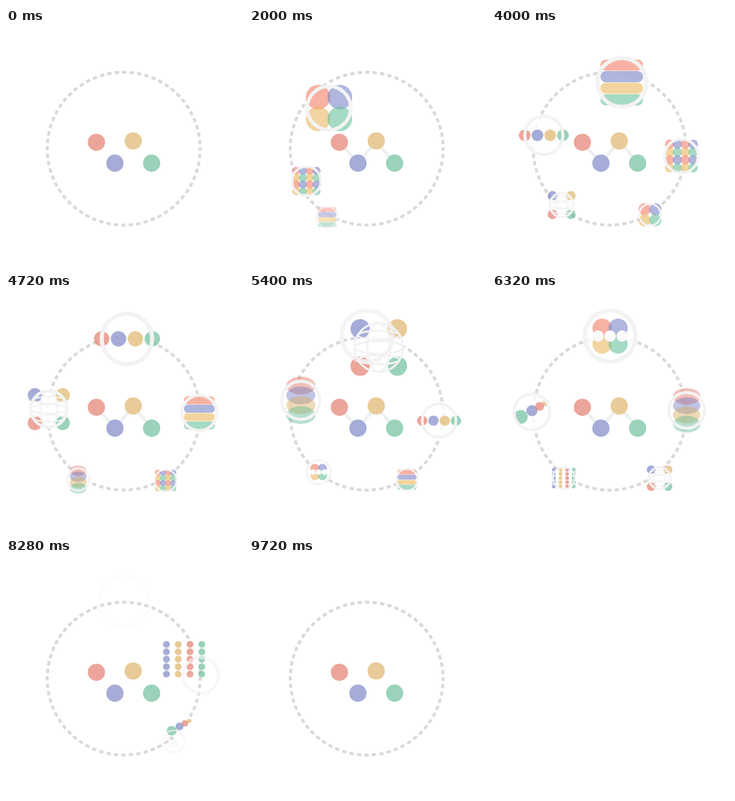
Recreate the animation shown at these times as an HTML page with a canvas. Size 297 px wide and 297 px high, loop 9.9 s.

```html
<!DOCTYPE html>
<html lang="en">
<head>
<meta charset="utf-8">
<title>Dots on a circle</title>
<style>
  html, body { margin: 0; width: 100%; height: 100%; overflow: hidden; background: #fff; }
  canvas { display: block; width: 297px; height: 297px; }
</style>
</head>
<body>
<canvas id="stage"></canvas>
<script>
const SIZE = 297, LOOP = 9900, MOVE = 320, STEPS = 14;
const RED = '#df6957', BLUE = '#6975be', YELLOW = '#d9a853', GREEN = '#57b48c';
const COLORS = [RED, BLUE, YELLOW, GREEN];
const BRIGHT = ['#f37f67', '#7b85c8', '#ebb761', '#69c19d'];
const PALE = '#f3f3f3';

const canvas = document.getElementById('stage');
const ctx = canvas.getContext('2d');
const ratio = window.devicePixelRatio || 1;
canvas.width = canvas.height = Math.round(SIZE * ratio);

const lerp = (a, b, p) => a + (b - a) * p;
const clamp = v => Math.max(0, Math.min(1, v));

function ellipse(x, y, rx, ry = rx) {
  ctx.beginPath();
  ctx.ellipse(x, y, rx, ry, 0, 0, Math.PI * 2);
}
function dot(color, x, y, rx, ry) {
  ctx.fillStyle = color;
  ellipse(x, y, rx, ry);
  ctx.fill();
}
function withAlpha(alpha, draw) {
  ctx.save();
  ctx.globalAlpha *= alpha;
  draw();
  ctx.restore();
}
function corners(colors, offset, r) {
  colors.forEach((c, i) => dot(c, i % 2 ? offset : -offset, i < 2 ? -offset : offset, r));
}

// Each icon is drawn around 0,0 at the size it has on top of the circle.
function quartet() { corners(BRIGHT, 16, 18); }

function mosaic() {
  for (let j = 0; j < 4; j++) {
    for (let i = 0; i < 4; i++) {
      dot(BRIGHT[j % 2 * 2 + i % 2], (i - 1.5) * 15, (j - 1.5) * 15, 8.8);
    }
  }
}
function stripes() {
  BRIGHT.forEach((c, i) => {
    ctx.fillStyle = c;
    ctx.beginPath();
    ctx.roundRect(-28, (i - 2) * 15.2 + 0.3, 56, 14.6, 7);
    ctx.fill();
  });
}
function row() { COLORS.forEach((c, i) => dot(c, (i - 1.5) * 21.4, 0, 9.8)); }

function spread() { corners([BLUE, YELLOW, RED, GREEN], 24.5, 12.7); }

function globe() {
  ctx.strokeStyle = PALE;
  ctx.lineWidth = 2.6;
  for (const [y, rx, ry] of [[0, 32, 32], [0, 15, 32], [0, 32, 8], [-16, 27, 6], [16, 27, 6]]) {
    ellipse(0, y, rx, ry);
    ctx.stroke();
  }
}
function stack() {
  withAlpha(0.7, () => COLORS.forEach((c, i) => dot(c, 0, (i - 1.5) * 16.5, 24.5, 15)));
}
function cluster() { corners(BRIGHT, 10, 12); }

function threeSpots() { [-15, 0, 15].forEach(x => dot('#fafafa', x, 0, 7.2)); }

function comet() {
  dot(GREEN, -20, 9, 12.5);
  dot(BLUE, 0, -2, 10);
  dot(RED, 14, -10, 8);
  dot(YELLOW, 25, -16, 5.5);
}
function columns() {
  [BLUE, YELLOW, RED, GREEN].forEach((c, i) => {
    for (let j = -2; j <= 2; j++) dot(c, (i - 1.5) * 19.3, j * 12.2, 5.6);
  });
}

// On leaving the top, "still" rings fade from place to place instead of travelling.
const icons = [
  { shape: quartet, from: [93, 233], to: [198, 234] },
  { shape: mosaic, from: [95, 237], to: [200, 235] },
  { shape: stripes, from: [98, 237], to: [198, 234] },
  { shape: row, from: [93, 237], to: [206, 232] },
  { shape: spread, from: [94, 235], to: [210, 232], glyph: globe, still: true },
  { shape: stack, from: [92, 237], to: [209, 231] },
  { shape: cluster, from: [94, 238], to: [208, 230], glyph: threeSpots, still: true },
  { shape: comet, from: [91, 233], to: [210, 230], still: true },
  { shape: columns, from: [90, 232], to: [214, 220], still: true }
];

function stations({ from, to }) {
  return [
    [...from, 0.4], [...from, 0.43], [50, 149, 0.7], [148, 54, 1],
    [244, 147, 0.7], [...to, 0.43], [...to, 0.4]
  ];
}

function progress(step, t) {
  const odd = step % 2;
  const start = (odd ? 1087 : 400) + Math.floor(step / 2) * 1400;
  const p = clamp((t - start) / MOVE) ** (odd ? 1 : 1.475);
  return p < 0.5 ? (2 * p) ** 3.5 / 2 : 1 - (2 - 2 * p) ** 3.5 / 2;
}

function at([x, y, scale], draw) {
  ctx.save();
  ctx.translate(x, y);
  ctx.scale(scale, scale);
  draw();
  ctx.restore();
}
function ring() {
  ctx.strokeStyle = PALE;
  ctx.lineWidth = 5.2;
  ellipse(0, 0, 32);
  ctx.stroke();
}

function drawIcon(icon, place) {
  if (place <= 0 || place >= 6) return;
  const stops = stations(icon);
  const i = Math.floor(place), p = place - i;
  const pose = stops[i].map((v, n) => lerp(v, stops[i + 1][n], p));
  const alpha = clamp(2.2 * Math.min(place, 6 - place) - 0.4);
  withAlpha(alpha, () => {
    at(pose, () => {
      withAlpha(0.8, () => dot('#fff', 0, 0, 31));
      withAlpha(0.6, icon.shape);
      if (icon.glyph) icon.glyph();
    });
    if (icon.still && (i === 3 || i === 4)) {
      withAlpha(1 - p, () => at(stops[i], ring));
      withAlpha(p * p, () => at(stops[i + 1], ring));
    } else {
      at(pose, ring);
    }
  });
}

function drawTrack() {
  const r = 95.8, period = 2 * Math.PI * r / 64;
  ctx.save();
  ctx.strokeStyle = '#d9d9d9';
  ctx.lineWidth = 3.6;
  ctx.setLineDash([5.4, period - 5.4]);
  ctx.lineDashOffset = 2.7;
  ellipse(147.5, 151.2, r);
  ctx.stroke();
  ctx.restore();
}

function drawCentre(linkAlpha) {
  const points = [[113.3, 143.2], [136.5, 169.4], [159.4, 141.5], [182.5, 169.4]];
  withAlpha(linkAlpha, () => {
    ctx.strokeStyle = '#eff1f1';
    ctx.lineWidth = 4;
    ctx.beginPath();
    points.forEach(([x, y]) => ctx.lineTo(x, y));
    ctx.stroke();
  });
  const fills = ['#eca59a', '#a5acd8', '#e8cb98', '#9ad2ba'];
  points.forEach(([x, y], i) => dot(fills[i], x, y, 10.8));
}

function frame(now) {
  const t = now % LOOP;
  const moves = Array.from({ length: STEPS }, (_, step) => progress(step, t));
  ctx.setTransform(canvas.width / SIZE, 0, 0, canvas.height / SIZE, 0, 0);
  ctx.fillStyle = '#fff';
  ctx.fillRect(0, 0, SIZE, SIZE);
  drawTrack();
  drawCentre(moves[1] - moves[10]);
  icons.forEach((icon, k) =>
    drawIcon(icon, moves.slice(k, k + 6).reduce((sum, p) => sum + p, 0)));
}

const begin = performance.now();
function tick() {
  frame(performance.now() - begin);
  requestAnimationFrame(tick);
}
tick();
</script>
</body>
</html>
```
